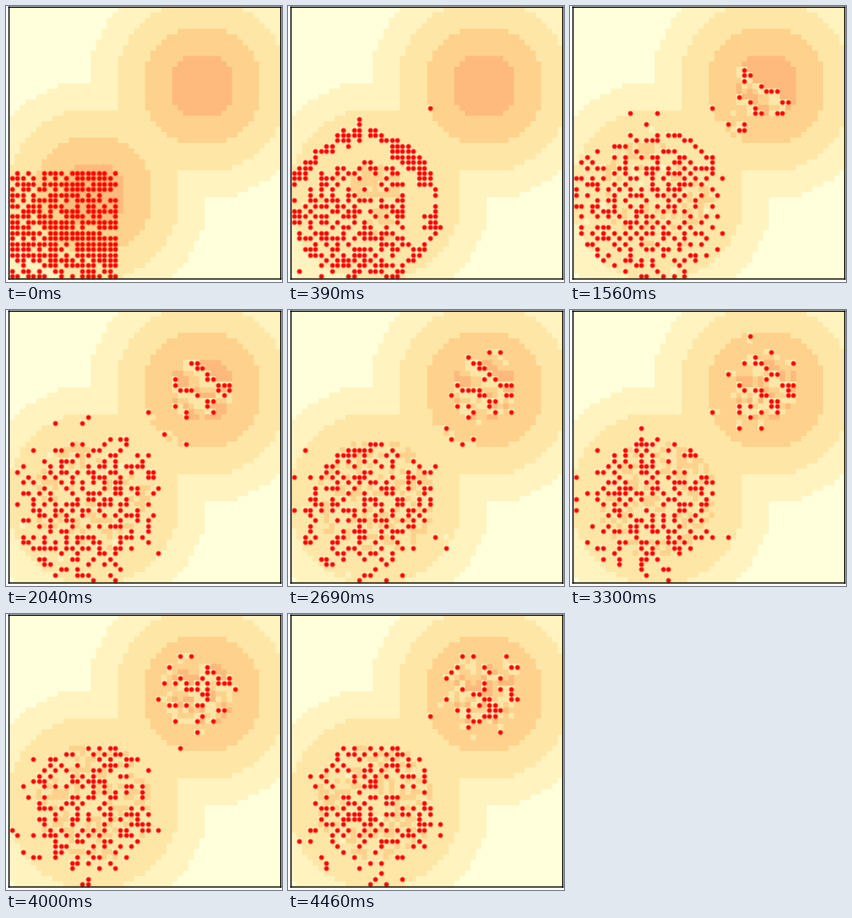
A matplotlib script for the animation above (5200 ms loop, 276 by 276 pixels).

```python
import matplotlib.pyplot as plt
import numpy as np
from matplotlib.animation import FuncAnimation

SIZE, DPI = 276, 96
PX = 72 / DPI  # one pixel in points
LOOP, TICK = 5200, 10
N, BOX, NUM_AGENTS, MAX_VISION = 50, 20, 300, 16

# moments (ms) at which the model advances by one step
STEP_TIMES = [30, 210, 390, 570, 720, 900, 1050, 1260, 1410, 1560,
              1740, 1920, 2040, 2230, 2380, 2500, 2690, 2810, 3000, 3150,
              3300, 3420, 3570, 3720, 3880, 4000, 4190, 4340, 4460]


def make_capacity():
    rows, cols = np.indices((N, N))
    dist = np.minimum(np.hypot(rows - 15, cols - 15),
                      np.hypot(rows - 35, cols - 35))
    return np.digitize(dist, [21, 16, 11, 6])


def visible_locs(vision):
    """Cells along the four axes, nearest first, in random order per ring."""
    rings = []
    for d in range(1, vision + 1):
        ring = np.array([[-d, 0], [d, 0], [0, -d], [0, d]])
        np.random.shuffle(ring)
        rings.append(ring)
    return np.vstack(rings)


class Agent:
    def __init__(self, loc):
        self.loc = tuple(loc)
        self.age = 0
        self.vision = np.random.randint(1, MAX_VISION + 1)
        self.metabolism = np.random.uniform(1, 4)
        self.lifespan = np.random.uniform(10000, 10000)
        self.sugar = np.random.uniform(5, 25)

    def step(self, world):
        self.loc = world.best_cell(self.loc, self.vision)
        self.sugar += world.harvest(self.loc) - self.metabolism
        self.age += 1

    def is_dead(self):
        return self.sugar < 0 or self.age > self.lifespan


class Sugarscape:
    def __init__(self):
        self.capacity = make_capacity()
        self.sugar = self.capacity.copy()
        locs = np.array([(i, j) for i in range(BOX) for j in range(BOX)])
        np.random.shuffle(locs)
        self.agents = [Agent(loc) for loc in locs[:NUM_AGENTS]]
        self.occupied = {agent.loc for agent in self.agents}

    def best_cell(self, center, vision):
        cells = map(tuple, (visible_locs(vision) + center) % N)
        free = [cell for cell in cells if cell not in self.occupied]
        return max(free, key=lambda cell: self.sugar[cell], default=center)

    def harvest(self, loc):
        amount = self.sugar[loc]
        self.sugar[loc] = 0
        return amount

    def step(self):
        for agent in np.random.permutation(self.agents):
            self.occupied.remove(agent.loc)
            agent.step(self)
            if agent.is_dead():
                self.agents.remove(agent)
            else:
                self.occupied.add(agent.loc)
        self.sugar = np.minimum(self.sugar + 1, self.capacity)

    def snapshot(self):
        rows, cols = np.transpose([agent.loc for agent in self.agents])
        # finer grid, so that smoothing only softens the cell edges
        cells = np.kron(self.sugar, np.ones((4, 4)))
        return cells, cols + 0.5, rows + 0.5


np.random.seed(17)
world = Sugarscape()
states = [world.snapshot()]
for _ in STEP_TIMES:
    world.step()
    states.append(world.snapshot())

fig = plt.figure(figsize=(SIZE / DPI, SIZE / DPI), dpi=DPI, facecolor="white")
side = 271.8 / SIZE
ax = fig.add_axes([3 / SIZE, 3 / SIZE, side, side])
ax.set_xticks([])
ax.set_yticks([])
for spine in ax.spines.values():
    spine.set_linewidth(1.25 * PX)
    spine.set_snap(False)

image = ax.imshow(states[0][0], cmap="YlOrRd", vmin=0, vmax=9, alpha=0.7,
                  origin="lower", interpolation="bilinear",
                  extent=[0, N, 0, N], aspect="auto")
# the "." marker is drawn at half its nominal size; its rim is soft
points, = ax.plot([], [], ".", color="red", markersize=2 * 4 * PX,
                  markeredgewidth=1.6 * PX, markeredgecolor=(1, 0, 0, 0.45))
ax.axis([0, N, 0, N])


def update(frame):
    step = np.searchsorted(STEP_TIMES, frame * TICK, side="right")
    cells, xs, ys = states[step]
    image.set_data(cells)
    points.set_data(xs, ys)
    return image, points


anim = FuncAnimation(fig, update, frames=LOOP // TICK, interval=TICK,
                     repeat=True, repeat_delay=0)
plt.show()
```
